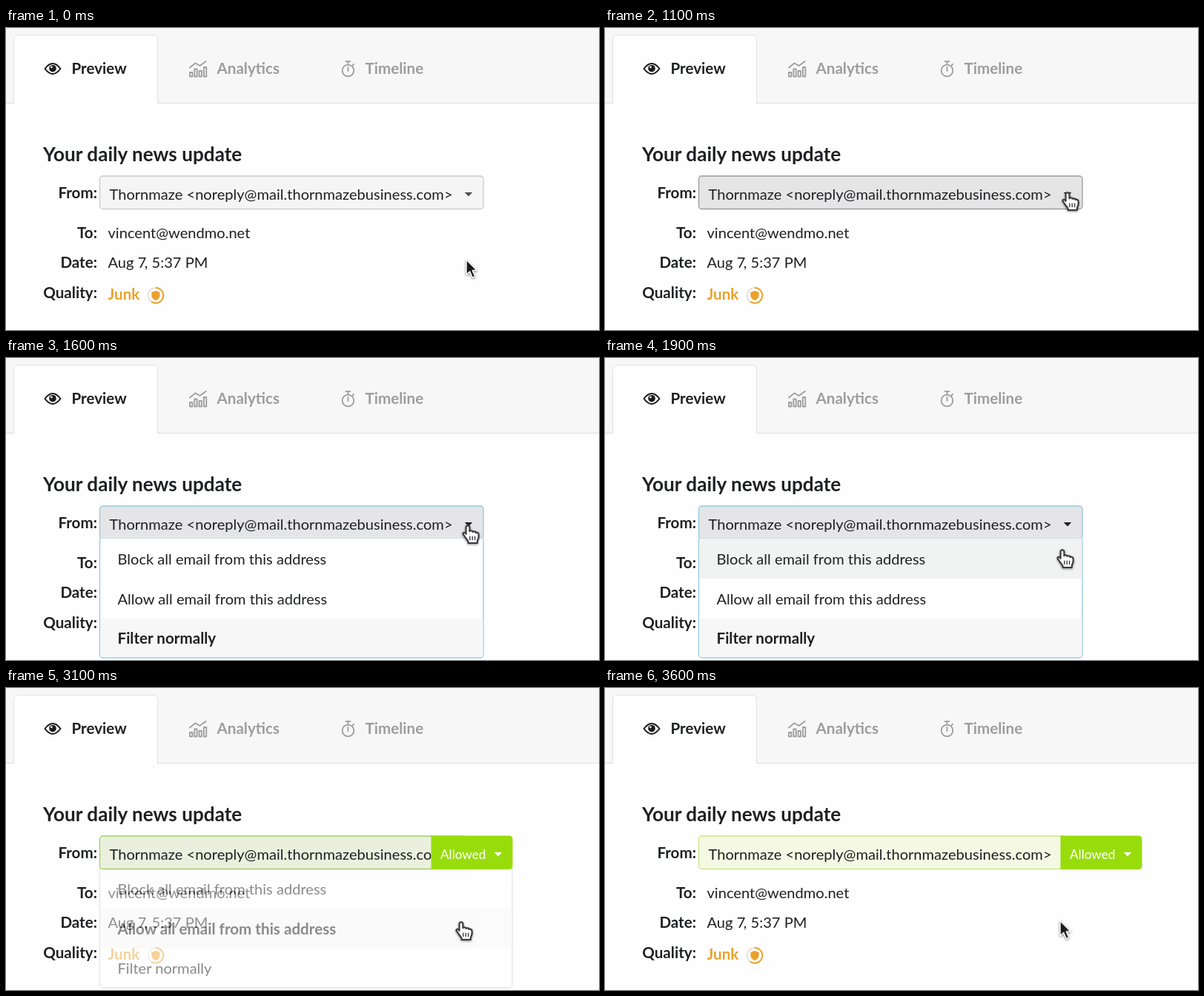
Animation, 800 px wide and 408 px high, one loop 8000 ms. Source, as an HTML page:

```html
<!DOCTYPE html>
<html lang="en">
<head>
<meta charset="utf-8">
<title>Mail preview</title>
<style>
html, body { margin: 0; width: 100%; height: 100%; overflow: hidden; background: #fefefe; }
svg { display: block; width: 100%; height: 100%; }
text { font: 400 20.1px Lato, sans-serif; fill: #1f2022; white-space: pre; }
.bold, .labels text, .idle text { font-size: 20.6px; font-weight: 700; }
.title { font-size: 26.15px; font-weight: 700; }
.labels text { text-anchor: end; }
.idle text { fill: #9d9d9d; }
.icon { fill: none; stroke: #9d9d9d; stroke-width: 1.8; stroke-linejoin: round; stroke-linecap: round; }
.tag text { font-size: 17.2px; fill: #fff; }
.row { fill: #f7f7f7; }
.hover { fill: #f1f2f2; }

/* One step of 100 ms is 1.25% of the loop. */
.anim { animation: 8s step-end -20ms infinite; }

#button { animation-name: button; }
@keyframes button {
  0%     { fill: #f5f5f5; stroke: #cbcbcb; }
  11.25% { fill: #ececed; stroke: #b4b4b4; }
  12.5%  { fill: #e5e5e6; stroke: #9c9c9c; }
  16.25% { fill: #e5e5e7; stroke: #98b7c2; }
  17.5%, 100% { fill: #e5e5e8; stroke: #96c8da; }
}
#caret { animation-name: caret; }
@keyframes caret {
  0% { fill: #505050; }
  11.25%, 100% { fill: #1f2022; }
}
#plain { animation-name: plain; }
@keyframes plain {
  0% { visibility: visible; }
  38.75%, 100% { visibility: hidden; }
}
.allowed { animation-name: allowed; }
@keyframes allowed {
  0% { visibility: hidden; }
  38.75%, 100% { visibility: visible; }
}
#field { animation-name: field; }
@keyframes field {
  0%     { fill: #ebf0de; stroke: #9fd06a; }
  40%    { fill: #eff4df; stroke: #b2da72; }
  41.25% { fill: #f3f7e1; stroke: #c3e47c; }
  42.5%, 100% { fill: #f5f9e4; stroke: #cbe886; }
}
#tag { animation-name: tag; }
@keyframes tag {
  0%  { transform: translateX(-41px); }
  40% { transform: translateX(-8px); }
  41.25%, 100% { transform: none; }
}
#menu { animation-name: menu; }
@keyframes menu {
  0%     { opacity: 0; }
  16.25% { opacity: .12; }
  17.5%  { opacity: .57; }
  18.75% { opacity: .94; }
  20%    { opacity: 1; }
  38.75%, 100% { opacity: 0; }
}
#closing { animation-name: closing; }
@keyframes closing {
  0%     { opacity: 0; }
  38.75% { opacity: .52; }
  40%    { opacity: .1; }
  41.25%, 100% { opacity: 0; }
}
#hoverBlock { animation-name: hoverBlock; }
@keyframes hoverBlock {
  0% { opacity: 0; }
  22.5% { opacity: 1; }
  26.25%, 100% { opacity: 0; }
}
#hoverAllow { animation-name: hoverAllow; }
@keyframes hoverAllow {
  0% { opacity: 0; }
  26.25%, 100% { opacity: 1; }
}
#cursor { animation-name: cursor; filter: drop-shadow(0 1.5px 1.5px rgba(0, 0, 0, .5)); }
@keyframes cursor {
  0%     { transform: translate(621px, 313px); }
  6.25%  { transform: translate(621px, 309px); }
  7.5%   { transform: translate(621px, 298px); }
  8.75%  { transform: translate(622px, 279px); }
  10%    { transform: translate(622px, 258px); }
  11.25% { transform: translate(623px, 238px); }
  12.5%  { transform: translate(623px, 226px); }
  13.75% { transform: translate(623px, 223px); }
  20%    { transform: translate(622px, 227px); }
  21.25% { transform: translate(620px, 237px); }
  22.5%  { transform: translate(618px, 249px); }
  23.75% { transform: translate(616px, 260px); }
  25%    { transform: translate(614px, 290px); }
  26.25% { transform: translate(613px, 311px); }
  27.5%  { transform: translate(613px, 317px); }
  41.25% { transform: translate(613px, 316px); }
  45%, 100% { transform: translate(614px, 314.5px); }
}
#arrow { animation-name: arrow; }
@keyframes arrow {
  0% { visibility: visible; }
  11.25% { visibility: hidden; }
  41.25%, 100% { visibility: visible; }
}
#hand { animation-name: hand; }
@keyframes hand {
  0% { visibility: hidden; }
  11.25% { visibility: visible; }
  41.25%, 100% { visibility: hidden; }
}
</style>
</head>
<body>
<svg viewBox="0 0 800 408">
  <!-- Tabs -->
  <rect width="800" height="101" fill="#f7f7f7"/>
  <path d="M0 101.5H800" stroke="#dedede"/>
  <path d="M10.5 102V15a5.5 5.5 0 0 1 5.5-5.5H199a5.5 5.5 0 0 1 5.5 5.5V102" fill="#fefefe" stroke="#e2e2e5"/>
  <path d="M11 101H204V104H11z" fill="#fefefe"/>

  <path d="M52.5 55Q63 41 73.5 55Q63 69 52.5 55z" fill="#fff" stroke="#1b1c1d" stroke-width="2" stroke-linejoin="round"/>
  <circle cx="63" cy="54.7" r="4.8" fill="#1b1c1d"/>
  <circle cx="61.4" cy="52.9" r="1.4" fill="#fff"/>
  <text class="bold" x="88.5" y="62.3">Preview</text>

  <g class="idle">
    <g class="icon">
      <path d="M248 65.5V60h3.4v5.5zM254.3 65.5V55.5h3.4V65.5zM260.6 65.5V58h3.4v7.5zM266.9 65.5V53h3.4V65.5z"/>
      <path d="M248 53.5L255.5 47.5L261.5 51L269.8 45"/>
    </g>
    <text x="284.5" y="62.3">Analytics</text>
    <g class="icon">
      <circle cx="461.5" cy="57.5" r="7.8"/>
      <path d="M461.5 49V45.5M458.5 45.2h6M461.5 53V58M467.5 50.5l1.6-1.6"/>
    </g>
    <text x="484.5" y="62.3">Timeline</text>
  </g>

  <!-- Message details -->
  <text class="title" x="50" y="180.3">Your daily news update</text>
  <g class="labels">
    <text x="123" y="230.2">From:</text>
    <text x="123" y="283.5">To:</text>
    <text x="123" y="324">Date:</text>
    <text x="123" y="365.2">Quality:</text>
  </g>
  <text x="137.5" y="283.5">vincent@wendmo.net</text>
  <text x="137.5" y="324">Aug 7<tspan dx="-2.5">, 5:37 PM</tspan></text>
  <text class="bold" x="137.5" y="367.4" style="fill:#eaa22d">Junk</text>
  <circle cx="202" cy="361.3" r="10.3" fill="none" stroke="#e6dccb" stroke-width="1.6"/>
  <path d="M202 351A10.3 10.3 0 1 1 196 369.7" fill="none" stroke="#eaa22d" stroke-width="2"/>
  <path d="M202 355L207.6 357V361.5C207.6 364.5 205 366.8 202 368C199 366.8 196.4 364.5 196.4 361.5V357z" fill="#eaa22d"/>

  <!-- Menu after the choice -->
  <g id="closing" class="anim">
    <path d="M126.5 244H683V401a4 4 0 0 1-4 4H130.5a4 4 0 0 1-4-4z" fill="#fff" stroke="#ccc" stroke-width="1.3"/>
    <rect class="row" x="127.2" y="298" width="555.1" height="53.5"/>
    <text x="150.5" y="279.2">Block all email from this address</text>
    <text class="bold" x="150.5" y="332.5">Allow all email from this address</text>
    <text x="150.5" y="386.2">Filter normally</text>
  </g>

  <!-- Sender -->
  <g id="plain" class="anim">
    <rect id="button" class="anim" x="126.5" y="200" width="517.5" height="44.5" rx="4" stroke-width="1.3"/>
    <path id="caret" class="anim" d="M618.7 222h10.6l-5.3 5.6z"/>
  </g>
  <g class="anim allowed">
    <rect id="field" class="anim" x="126.5" y="200" width="495" height="44.5" rx="4" stroke-width="1.3"/>
  </g>
  <text x="139.5" y="231.5">Thornmaze &lt;noreply@mail.thornmazebusiness.com&gt;</text>
  <g class="anim allowed tag">
    <g id="tag" class="anim">
      <path d="M614.5 199.5H720a4.5 4.5 0 0 1 4.5 4.5V240.5a4.5 4.5 0 0 1-4.5 4.5H614.5z" fill="#98dd0b"/>
      <text x="627" y="231">Allowed</text>
      <path d="M699.8 222h10.4l-5.2 5.4z" fill="#fff"/>
    </g>
  </g>

  <!-- Open menu, joined to the button without a line between -->
  <g id="menu" class="anim">
    <path d="M126.5 244V401a4 4 0 0 0 4 4H640a4 4 0 0 0 4-4V244" fill="#fff" stroke="#96c8da" stroke-width="1.3"/>
    <path class="row" d="M127.2 351.5H643.3V401a3.3 3.3 0 0 1-3.3 3.3H130.5a3.3 3.3 0 0 1-3.3-3.3z"/>
    <rect id="hoverBlock" class="hover anim" x="127.2" y="244" width="516.1" height="54"/>
    <rect id="hoverAllow" class="hover anim" x="127.2" y="298" width="516.1" height="53.5"/>
    <text x="150.5" y="279.2">Block all email from this address</text>
    <text x="150.5" y="332.5">Allow all email from this address</text>
    <text class="bold" x="150.5" y="386.2">Filter normally</text>
  </g>

  <!-- Pointer -->
  <g id="cursor" class="anim">
    <path id="arrow" class="anim" d="M0 0V20.3L4.7 16L8.2 24.2L11.9 22.6L8.4 14.6H14.6z" fill="#1c1c1c" stroke="#fff" stroke-width="1.5" stroke-linejoin="round"/>
    <g id="hand" class="anim" transform="translate(1 -1)" stroke="#3a3a3c" stroke-linejoin="round" stroke-linecap="round">
      <path d="M-2.4 2.8a2.4 2.4 0 0 1 4.8 0V8.3C3.2 6.8 6 7 6.6 8.9C7.6 7.8 10.2 8.2 10.6 10C12 9.2 14.6 10 14.6 12.4V16C14.6 18.4 12.8 19.6 12.8 21.8V24H.6V22.4C.6 20.4-2.8 18-4.2 15L-6.2 12.2C-7.2 10.4-5.2 9-3.6 10.4L-2.4 11.8z" fill="#fff" stroke-width="2.1"/>
      <path d="M2.8 15.2V19.6M6.2 15.2V19.6M9.6 15.2V19.6" stroke-width="1.4"/>
    </g>
  </g>
</svg>
</body>
</html>
```
